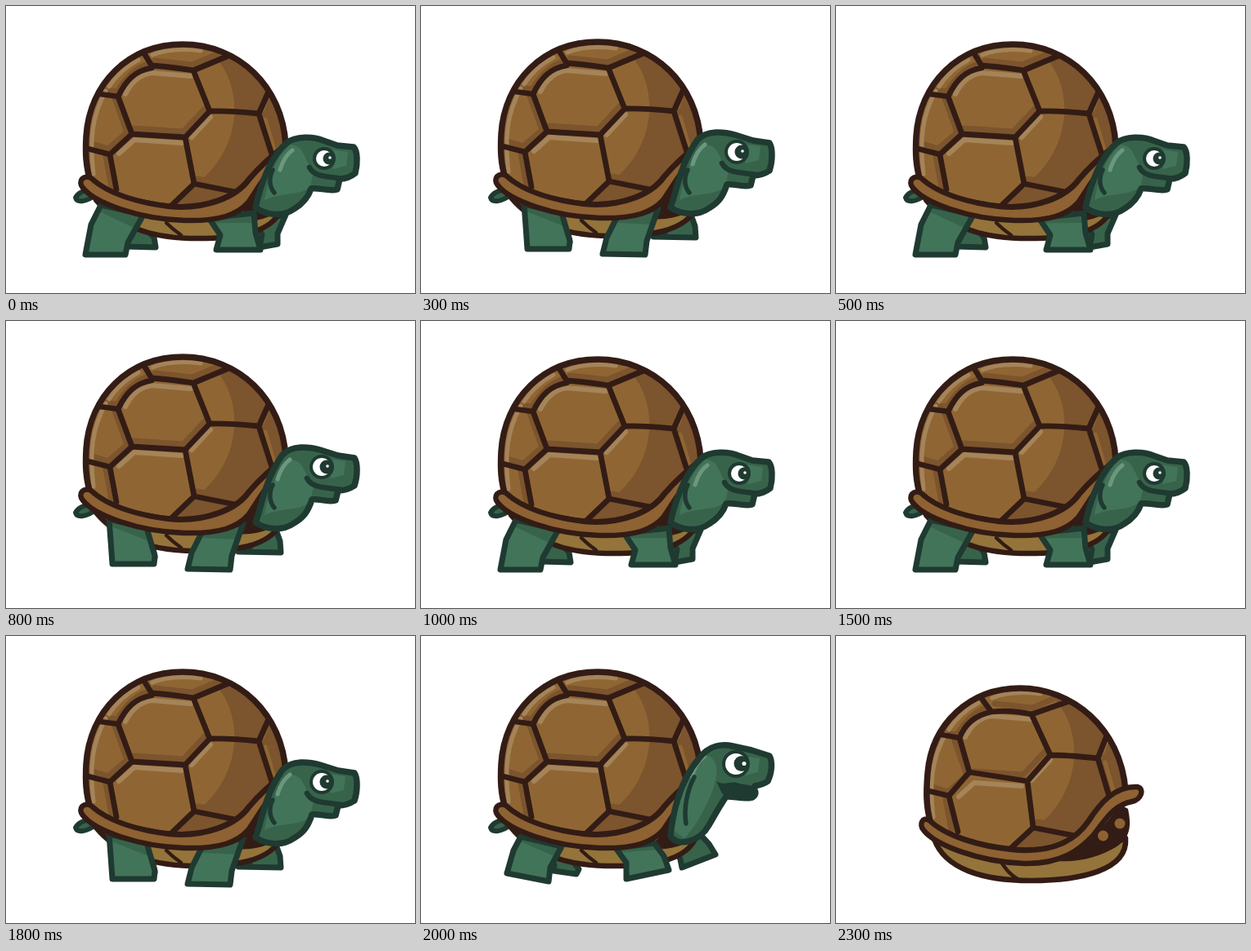
Animation, 500 px wide and 352 px high, one loop 7.3 s. Source, as an HTML page:

```html
<!DOCTYPE html>
<html lang="en">
<head>
<meta charset="utf-8">
<title>Turtle</title>
<style>
html, body { margin: 0; width: 100%; height: 100%; overflow: hidden; background: #fff; }
svg { display: block; width: 100vw; height: 100vh; }
path, circle { stroke-linejoin: round; stroke-linecap: round; }
</style>
</head>
<body>
<svg id="stage" viewBox="0 0 500 352"></svg>
<script>
const LOOP = 7300;
const STRIDE = [0, .4, .9, 1, .5];
const BROWN = '#331c15', SHELL = '#8f6633', SHADE = '#7c542d', SHINE = '#a5845a', RIM = '#8e6232';
const INK = '#1f3a31', GREEN = '#42745a', MOSS = '#38634b', MINT = '#6c977f';

// Each pair of paths shares its commands, so numbers can be blended.
const DOME = [
  'M104,218 C97,195 97,180 98,160 C102,95 150,47 216,47 C284,47 338,98 342,171 C322,186 308,200 297,213 C282,234 245,250 200,246 C165,242 125,232 104,218Z',
  'M116,230 C110,210 110,192 112,168 C117,108 163,64 225,64 C288,64 348,112 354,190 C333,198 320,210 309,227 C288,258 255,266 215,262 C175,258 135,245 116,230Z'
];
const RIM_PATH = [
  'M104,211 C95,206 87,215 94,223 C108,241 160,261 218,263 C262,264 283,256 296,241 C309,222 322,198 345,176 C347,173 345,168 342,171 C322,186 308,200 297,213 C282,234 245,250 200,246 C165,242 125,231 104,211Z',
  'M114,226 C106,221 101,231 107,238 C120,255 172,277 230,279 C276,280 298,262 314,245 C328,228 337,208 362,203 C373,201 378,187 368,185 C340,184 322,206 309,227 C288,258 255,266 215,262 C175,258 135,246 114,226Z'
];
const BELLY = [
  'M110,238 C135,268 172,284 225,285 C275,286 325,281 337,248 L300,244 L200,258Z',
  'M120,249 C133,286 180,300 238,300 C300,300 357,287 354,248 L320,262 L220,275Z'
];
const SEAM = ['M196,266 C202,272 207,276 214,281', 'M203,279 C208,286 213,293 222,298'];
const CAVITY = [
  'M275,263 C294,255 308,222 340,174 L345,180 C345,220 337,248 322,258 C308,264 292,266 275,263Z',
  'M272,276 C302,266 325,235 348,207 L357,212 C361,232 361,247 342,259 C322,271 295,278 272,276Z'
];
const SEAMS = [
  'M170,60 L178,73 C196,74 215,77 229,79 L272,61 M229,79 L249,129 C270,128 290,130 309,132 L321,105 M309,132 L325,182 M178,76 C159,79 147,90 137,111 L115,108 M137,111 L154,157 L219,161 L249,129 M154,157 L127,182 L100,175 M127,182 L135,225 M219,161 L230,218 L202,245 M230,218 L285,229',
  'M179,78 L190,93 C206,91 226,93 239,96 L285,80 M239,96 L262,146 C282,146 300,148 320,150 L331,122 M320,150 L335,200 M190,93 C171,97 158,107 151,125 L129,121 M151,125 L163,167 L234,178 L262,146 M163,167 L138,196 L113,190 M138,196 L149,240 M234,178 L241,235 L213,261 M241,235 L292,245'
];
const HEAD = {
  low: 'M305,247 C310,225 320,188 343,168 C354,159 376,160 388,165 L405,171 L425,173 C430,178 430,194 427,205 C422,209 414,212 408,212 L405,225 C394,228 382,222 373,224 C369,236 362,243 352,249 C338,259 318,257 305,247Z',
  high: 'M305,247 C312,230 316,195 338,164 C350,152 370,154 384,158 L406,165 L426,168 C430,174 430,190 426,202 C420,206 412,208 406,208 L403,220 C392,223 382,217 374,219 C369,234 364,241 352,248 C338,258 318,256 305,247Z',
  alert: 'M305,245 C307,225 314,180 340,150 C352,134 368,132 381,135 L404,140 L426,147 C430,154 429,168 424,178 C420,181 414,183 408,184 L405,198 C394,201 382,196 373,197 C364,210 358,222 352,232 C341,252 314,260 305,245Z'
};
const LEGS = {
  low: {
    backFar: 'M140,266 L148,279 L146,295 L183,296 L181,284 L165,266Z',
    frontFar: 'M303,263 L313,280 L310,296 L332,292 L332,279 L342,256Z',
    back: 'M116,244 L104,268 L97,305 L146,305 L149,290 L168,256Z',
    front: 'M248,260 L262,281 L257,299 L311,299 L305,278 L303,254Z'
  },
  high: {
    backFar: 'M140,262 L145,275 L143,290 L182,290 L180,280 L170,262Z',
    frontFar: 'M300,265 L298,279 L284,283 L336,284 L335,270 L330,256Z',
    back: 'M126,243 L128,270 L130,298 L181,298 L182,288 L172,254Z',
    front: 'M240,258 L227,284 L222,304 L274,305 L276,288 L290,248Z'
  },
  alert: {
    backFar: 'M155,268 L163,281 L162,288 L190,292 L193,286 L183,273Z',
    frontFar: 'M312,262 L317,274 L319,284 L360,268 L352,255 L342,244Z',
    back: 'M122,246 L113,263 L105,291 L156,301 L158,284 L172,258Z',
    front: 'M238,260 L251,278 L251,298 L303,287 L297,270 L285,254Z'
  }
};

const stage = document.getElementById('stage');
const lerp = (a, b, k) => a + (b - a) * k;
const numbers = d => d.match(/-?[\d.]+/g).map(Number);

function mix(a, b, k) {
  const to = numbers(b);
  let i = 0;
  return a.replace(/-?[\d.]+/g, n => lerp(+n, to[i++], k).toFixed(2));
}
const path = (d, fill, stroke = 'none', w = 0) =>
  `<path d="${d}" fill="${fill}" stroke="${stroke}" stroke-width="${w}"/>`;
const line = (d, color, w) => path(d, 'none', color, w);
const dot = (x, y, r, fill) => `<circle cx="${x}" cy="${y}" r="${r}" fill="${fill}"/>`;
const group = (transform, body) => `<g transform="${transform}">${body}</g>`;
const clip = (id, d, body) =>
  `<clipPath id="${id}"><path d="${d}"/></clipPath><g clip-path="url(#${id})">${body}</g>`;

function leg(d, far) {
  const p = numbers(d);
  const shade = `M${p[0]},${p[1]} L${lerp(p[0], p[2], .3)},${lerp(p[1], p[3], .3)} `
    + `L${lerp(p[10], p[8], .5)},${lerp(p[11], p[9], .5)} L${p[10]},${p[11]}Z`;
  return path(d, far ? MOSS : GREEN) + (far ? '' : path(shade, MOSS)) + line(d, INK, 7);
}

function shading() {
  return path('M257,64 C288,98 292,170 234,218 L200,248 L290,232 L328,190 L350,165 C335,110 300,70 270,55Z', SHADE)
    + line('M314,127 L319,112 M317,139 L329,180', SHELL, 5)
    + line('M157,150 L217,154 L243,126 M106,169 L125,175 L148,155 L133,113 M112,102 L136,105 C145,90 156,78 171,72 M182,67 L228,72 L268,55 M122,184 L129,222 M234,212 L283,222', SHADE, 7)
    + line('M146,108 C154,92 164,84 178,82 L226,86 M138,181 L157,164 L215,168 M227,161 L250,136', SHINE, 6)
    + line('M107,206 C102,165 105,135 122,104 M126,99 C136,83 149,73 162,66 M179,60 C196,53 215,52 238,55', SHINE, 5);
}

function shell(k) {
  const dome = mix(...DOME, k);
  const inside = group(`translate(${12 * k} ${16 * k})`, shading()) + line(mix(...SEAMS, k), BROWN, 6.8);
  return path(dome, SHELL) + clip('dome', dome, inside)
    + line(dome, BROWN, 7.5)
    + path(mix(...RIM_PATH, k), RIM, BROWN, 6.5);
}

function belly(k) {
  const d = mix(...BELLY, k);
  return path(d, '#94743a') + line(mix(...SEAM, k), BROWN, 4.5) + line(d, BROWN, 6.5)
    + path(mix(...CAVITY, k), BROWN);
}

function face(k) {
  const x = lerp(389, 386, k), y = lerp(187, 179, k), r = lerp(10, 11, k);
  return group(`translate(${-3 * k} ${-5 * k})`, line('M371,198 C376,208 389,209 398,210 L413,212', INK, 6.5))
    + dot(x, y, r + 4, INK) + dot(x, y, r, '#fff')
    + dot(x + 6, y, r - 2.5, INK) + dot(x + 7, y - 1, 1.8, '#fff');
}

function gasp() {
  return path('M361,178 C370,184 379,178 386,180 C396,183 404,182 411,187 C416,195 409,204 398,202 C390,202 384,197 377,200 L368,193Z', INK)
    + dot(385, 157, 17, INK) + dot(385, 157, 13, '#fff')
    + dot(392, 156.5, 9.5, INK) + dot(395, 156.5, 2.5, '#fff');
}

function head(d, k, alert) {
  const x = alert ? -4 : -3 * k, y = alert ? -29 : -7 * k;
  const neck = alert
    ? 'M308,238 C312,196 326,164 348,146 C368,150 362,180 352,200 C343,220 332,238 322,248Z'
    : 'M316,238 C322,205 332,184 348,170 C366,172 362,186 376,202 L372,222 C356,234 336,228 316,238Z';
  const mark = alert ? 'M324,230 C321,212 325,190 334,173' : 'M328,229 C322,222 321,211 326,201';
  const skin = path(neck, GREEN)
    + group(`translate(${x} ${y})`,
      path('M396,176 L418,179 L416,196 L400,200Z', GREEN)
      + line('M335,201 C338,191 343,182 350,177', MINT, 5));
  return path(d, MOSS) + clip('skin', d, skin)
    + line(mark, INK, 5.5) + line(d, INK, 7.5)
    + (alert ? gasp() : face(k));
}

function tail() {
  return path('M105,224 C95,226 88,229 85,235 C87,242 99,240 109,232Z', MOSS, INK, 6);
}

const bob = (k, body) => group(`translate(0 ${-3 * k})`, body);

function turtle(legs, front, k) {
  return tail() + leg(legs.backFar, true) + leg(legs.frontFar, true) + bob(k, belly(0))
    + leg(legs.back) + leg(legs.front) + bob(k, shell(0)) + front;
}

function walk(k) {
  const legs = {};
  for (const name in LEGS.low) legs[name] = mix(LEGS.low[name], LEGS.high[name], k);
  return turtle(legs, head(mix(HEAD.low, HEAD.high, k), k), k);
}

function tuck() {
  const legs = Object.values(LEGS.alert).map((d, i) => leg(d, i < 2)).join('');
  return group('translate(5 134) scale(1 .5)', legs)
    + belly(.5)
    + group('translate(-42 32)', head(HEAD.alert, 1, true))
    + shell(.5);
}

function hidden() {
  return belly(1) + shell(1) + dot(326.5, 245, 6.5, RIM) + dot(347, 230, 6.5, RIM);
}

function pose(step) {
  if (step < 20) return walk(STRIDE[step % 5]);
  if (step < 22) return turtle(LEGS.alert, head(HEAD.alert, 1, true), 1);
  return step < 23 ? tuck() : hidden();
}

let shown = -1;
const start = performance.now();
function draw(now) {
  const step = Math.min(23, Math.floor(Math.max(0, now - start) % LOOP / 100));
  if (step !== shown) stage.innerHTML = pose(shown = step);
  requestAnimationFrame(draw);
}
draw(start);
</script>
</body>
</html>
```
